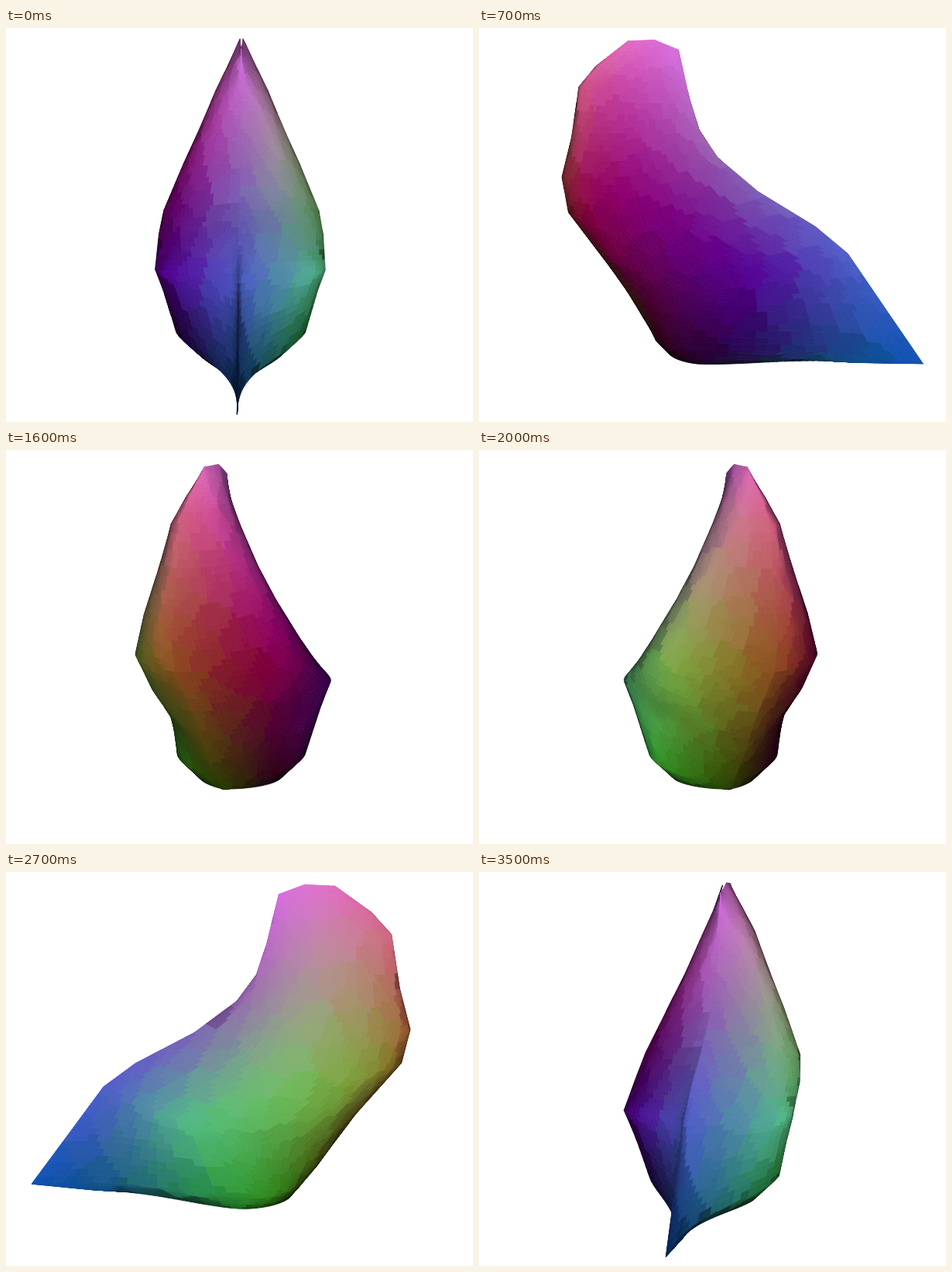
An HTML page with a canvas for the animation above (3600 ms loop, 603 px wide and 508 px high).

```html
<!DOCTYPE html>
<html>
<head>
<meta charset="utf-8">
<style>
html, body { margin: 0; width: 100%; height: 100%; overflow: hidden; background: #fff; }
canvas { display: block; }
</style>
</head>
<body>
<canvas id="stage" width="603" height="508"></canvas>
<script>
const ctx = document.getElementById('stage').getContext('2d');

// Axes: a = right, b = forward, h = up.
// Each row: back b, h | side a, b, h | front b, h | sharpness of the front ridge
const ROWS = [
  [-118, 233, 2, -80, 235, -48, 223, .8],
  [-165, 200, 18, -100, 200, -40, 190, .8],
  [-190, 173, 35, -105, 165, -33, 161, .8],
  [-202, 105, 58, -100, 112, -20, 122, .8],
  [-217, 52, 78, -88, 69, 5, 88, .9],
  [-207, 9, 104, -60, 8, 60, 47, 1],
  [-150, -58, 108, -25, -17, 136, 7, 1.2],
  [-120, -100, 107, 48, -48, 178, -24, 1.5],
  [-99, -130, 99, 30, -78, 225, -87, 2.2],
  [-80, -153, 86, 0, -139, 276, -155, 2.9],
  [-65, -171, 56, 0, -170, 193, -163, 2.5],
  [-58, -174, 2, 0, -176, 100, -168, 1]
];
const DOWN = 77, ROUND = 112, CELLS = 850;
const DIST = 1470, SIN = .188, COS = .982, CX = 303, CY = 254;

const mix = (p, q, k) => p + (q - p) * k;
const clamp = (v, lo, hi) => Math.max(lo, Math.min(hi, v));
const sub = (p, q) => p.map((v, k) => v - q[k]);
const cross = (p, q) => [p[1] * q[2] - p[2] * q[1], p[2] * q[0] - p[0] * q[2], p[0] * q[1] - p[1] * q[0]];

let seed = 11;
function random() {
  seed = (seed * 16807) % 2147483647;
  return seed / 2147483647;
}

function surface(i, j) {
  const t = i / DOWN * (ROWS.length - 1);
  const n = Math.min(ROWS.length - 2, Math.floor(t));
  const [bb, bh, a, sb, sh, fb, fh, q] = ROWS[n].map((v, k) => mix(v, ROWS[n + 1][k], t - n));
  const turn = j / ROUND * 2;
  const sign = turn < 1 ? 1 : -1;
  const c = Math.cos(Math.PI * turn);
  const f = Math.abs(c);
  const width = c > 0 ? (1 - f ** 1.6) ** q : (1 - f * f) ** .7;
  return [sign * a * width, mix(sb, c > 0 ? fb : bb, f), mix(sh, c > 0 ? fh : bh, f)];
}

const at = (i, j) => clamp(i, 0, DOWN) * ROUND + (j + ROUND) % ROUND;
const points = [];
for (let i = 0; i <= DOWN; i++)
  for (let j = 0; j < ROUND; j++) points.push(surface(i, j));

const faces = [];
for (let i = 0; i < DOWN; i++)
  for (let j = 0; j < ROUND; j++) {
    const corners = [at(i, j), at(i, j + 1), at(i + 1, j + 1), at(i + 1, j)];
    const mid = [0, 1, 2].map(k => corners.reduce((s, c) => s + points[c][k], 0) / 4);
    const n = cross(sub(points[at(i, j + 3)], points[at(i, j - 2)]),
                    sub(points[at(i + 3, j)], points[at(i - 2, j)]));
    const len = Math.hypot(...n) || 1;
    faces.push({ corners, mid, normal: n.map(v => v / len), right: j < ROUND / 2 });
  }

// Group the faces into irregular cells that share most of their tint.
const cells = Array.from({ length: CELLS }, () => faces[Math.floor(random() * faces.length)]);
for (const face of faces) {
  let best = Infinity, cell = face;
  const [x, y, z] = face.mid;
  for (const c of cells) {
    if (c.right !== face.right) continue;
    const d = (c.mid[0] - x) ** 2 + (c.mid[1] - y) ** 2 + (c.mid[2] - z) ** 2;
    if (d < best) { best = d; cell = c; }
  }
  const [a, b, h] = face.mid.map((v, k) => mix(v, cell.mid[k], .7));
  face.light = face.normal.map((v, k) => mix(v, cell.normal[k], .5));
  face.tint = [
    105 + .43 * h - .1 * b,
    82 + .95 * a + .12 * h + .06 * b,
    122 + .516 * h + .48 * b
  ].map(v => clamp(v, 0, 225));
}

function draw(angle) {
  const s = Math.sin(angle), c = Math.cos(angle);
  const view = [-s * COS, c * COS, SIN];
  const shown = points.map(([a, b, h]) => {
    const near = b * c - a * s;
    const z = near * COS + h * SIN;
    const w = 1 - z / DIST;
    return [CX + (a * c + b * s) / w, CY - (h * COS - near * SIN) / w, z];
  });
  const visible = [];
  for (const face of faces) {
    const p = face.corners.map(k => shown[k]);
    const area = (p[2][0] - p[0][0]) * (p[3][1] - p[1][1]) - (p[2][1] - p[0][1]) * (p[3][0] - p[1][0]);
    if (area > 0) visible.push({ face, p, z: p[0][2] + p[1][2] + p[2][2] + p[3][2] });
  }
  visible.sort((m, n) => m.z - n.z);

  ctx.fillStyle = '#fff';
  ctx.fillRect(0, 0, 603, 508);
  ctx.lineWidth = .8;
  ctx.lineJoin = 'round';
  for (const { face, p } of visible) {
    const facing = face.light.reduce((sum, v, k) => sum + v * view[k], 0);
    const shade = clamp(.25 + 1.3 * facing, .25, 1.04);
    ctx.fillStyle = ctx.strokeStyle = `rgb(${face.tint.map(v => Math.round(v * shade))})`;
    ctx.beginPath();
    for (const [x, y] of p) ctx.lineTo(x, y);
    ctx.closePath();
    ctx.fill();
    ctx.stroke();
  }
}

const start = performance.now();
let last = -1;
function tick() {
  const step = Math.floor((performance.now() - start) / 100) % 36;
  if (step !== last) {
    last = step;
    draw((step * 10 - .8) * Math.PI / 180);
  }
  requestAnimationFrame(tick);
}
tick();
</script>
</body>
</html>
```
